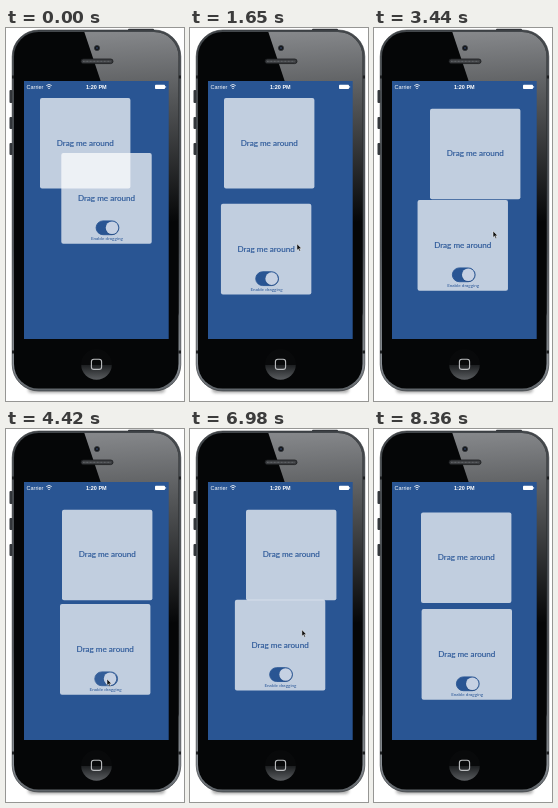
Animation, 178 px wide and 373 px high, one loop 9.44 s. Source, as an HTML page:

```html
<!DOCTYPE html>
<html lang="en">
<head>
<meta charset="utf-8">
<title>Draggable cards</title>
<style>
html, body { margin: 0; width: 100%; height: 100%; overflow: hidden; background: #fff; }
svg { display: block; width: 100%; height: 100%; }
text { font-family: Lato, "Open Sans", sans-serif; text-anchor: middle; fill: #2a5798; }
.label { font-size: 8.1px; stroke: #2a5798; stroke-width: .15; }
.small { font-size: 4.6px; }
.status text { font-family: "Liberation Sans", Arial, sans-serif; font-size: 5.5px; }
.status, .status text { fill: #fff; }
.card { fill: #fff; fill-opacity: .71; }
</style>
</head>
<body>
<svg viewBox="0 0 178 373" xmlns="http://www.w3.org/2000/svg">
  <defs>
    <linearGradient id="metal" x1="0" y1="0" x2="0" y2="1">
      <stop offset="0" stop-color="#43474b"/>
      <stop offset=".6" stop-color="#4d5257"/>
      <stop offset=".93" stop-color="#8b9096"/>
      <stop offset="1" stop-color="#5d6267"/>
    </linearGradient>
    <linearGradient id="gloss" gradientUnits="userSpaceOnUse" x1="140" y1="3" x2="150" y2="195">
      <stop offset="0" stop-color="#85878a"/>
      <stop offset=".35" stop-color="#56585a"/>
      <stop offset="1" stop-color="#050607"/>
    </linearGradient>
    <linearGradient id="home" x1="0" y1="0" x2="0" y2="1">
      <stop offset=".5" stop-color="#08090a"/>
      <stop offset=".52" stop-color="#1d1f21"/>
      <stop offset="1" stop-color="#5b5e61"/>
    </linearGradient>
    <filter id="soft" x="-20%" y="-200%" width="140%" height="500%"><feGaussianBlur stdDeviation="1.8"/></filter>
    <clipPath id="face"><rect x="8" y="4" width="164.5" height="356.5" rx="24.5"/></clipPath>
  </defs>

  <rect width="178" height="373" fill="#fff"/>
  <rect x="22" y="356" width="137" height="9" rx="4" fill="#777" opacity=".6" filter="url(#soft)"/>

  <g fill="#34383c">
    <rect x="3.5" y="62" width="3" height="13" rx="1"/>
    <rect x="3.5" y="89" width="3" height="12" rx="1"/>
    <rect x="3.5" y="115" width="3" height="12" rx="1"/>
    <rect x="122" y=".8" width="26" height="2" rx="1"/>
  </g>
  <rect x="6.2" y="2" width="168.6" height="361" rx="26.5" fill="url(#metal)" stroke="#2d3033" stroke-width=".6"/>
  <path d="M6 49h2.5M172.5 49h2.5M6 324h2.5M172.5 324h2.5" stroke="#1d1f21" stroke-width="3"/>
  <rect x="8" y="4" width="164.5" height="356.5" rx="24.5" fill="#050607"/>
  <path d="M78 3H173V288Z" fill="url(#gloss)" clip-path="url(#face)"/>

  <circle cx="91" cy="20" r="2.6" fill="#14161a" stroke="#303439" stroke-width=".7"/>
  <circle cx="91" cy="20" r=".9" fill="#30405e"/>
  <rect x="75" y="31" width="32" height="4.6" rx="2.3" fill="#3b3d40" stroke="#1a1b1d" stroke-width=".8"/>
  <path d="M77 33.3H105" stroke="#65686b" stroke-width="1.3" stroke-dasharray=".8 .6"/>
  <circle cx="90.5" cy="336.5" r="15.3" fill="url(#home)"/>
  <rect x="85.4" y="331.2" width="10.2" height="10.2" rx="2.5" fill="none" stroke="#bcbec0" stroke-width="1.1"/>

  <rect x="18" y="53" width="144.7" height="258" fill="#295593"/>
  <g class="status">
    <text x="29" y="61">Carrier</text>
    <text x="90.3" y="61" font-weight="bold">1:20 PM</text>
    <path d="M40.3 57.6Q43 55.2 45.7 57.6M41.4 59Q43 57.6 44.6 59" fill="none" stroke="#fff" stroke-width=".8"/>
    <circle cx="43" cy="60.4" r=".7"/>
    <rect x="149" y="56.7" width="10" height="4.4" rx=".8"/>
    <rect x="159.3" y="58" width=".8" height="1.8" rx=".3"/>
  </g>

  <g id="top">
    <rect class="card" width="90.4" height="90.4" rx="2"/>
    <text class="label" x="45.3" y="47.6">Drag me around</text>
  </g>
  <g id="bottom">
    <rect class="card" width="90.4" height="90.7" rx="2"/>
    <text class="label" x="45.2" y="47.8">Drag me around</text>
    <rect id="track" x="34.8" y="67.9" width="22.8" height="13.8" rx="6.9" stroke-width=".9"/>
    <circle id="shade" cy="75.4" r="6.5" fill="#1a3560" opacity=".28"/>
    <circle id="thumb" cy="74.8" r="6.3" fill="#c6d1e3"/>
    <text class="small" x="45.6" y="87.2">Enable dragging</text>
  </g>
  <path id="cursor" d="M0 0V6.4L1.5 5.1L2.5 7.4L3.6 6.9L2.6 4.7H4.6Z" fill="#111" stroke="#fff" stroke-width=".45" stroke-linejoin="round"/>
</svg>
<script>
const LOOP = 9440;
const SHOW = 920, HIDE = 8300;
const home = { top: [34, 70], bottom: [55.3, 125] };
const switchSpot = [101, 250];

const $ = id => document.getElementById(id);
const clamp = v => Math.min(1, Math.max(0, v));
const mix = (a, b, p) => a + (b - a) * p;
const mixPoint = (a, b, p) => a.map((v, i) => mix(v, b[i], p));
const ramp = (t, start, end) => {
  const p = clamp((t - start) / (end - start));
  return p * p * (3 - 2 * p);
};
const curve = (a, bend, b, p) => mixPoint(mixPoint(a, bend, p), mixPoint(bend, b, p), p);

// A drag carries a card along a curve, with the pointer holding it at `grab`.
const drag = (card, start, end, bend, to, grab) => ({
  card, start, end, bend, to,
  at: t => cardAt(card, t).map((v, i) => v + grab[i])
});
const tap = (start, end) => ({ start, end, at: () => switchSpot });
const shake = (start, end) => ({
  start, end,
  at: t => {
    const turn = 2 * Math.PI * (t - start) / (end - start);
    return [93 - 17 * Math.sin(turn), 218 + 8 * Math.sin(2 * turn)];
  }
});

const actions = [
  drag("bottom", 960, 1800, [35, 216], [30, 169], [76, 40]),
  drag("top", 1950, 2950, [21, 107.5], [56, 80.8], [56, 50.5]),
  drag("bottom", 3130, 3750, [45, 172], [54, 175], [75.5, 31]),
  tap(4250, 4480),
  shake(4820, 5770),
  tap(6120, 6400),
  drag("bottom", 6620, 7340, [39, 164], [47.6, 180], [67, 30]),
  drag("top", 7700, 8200, [51, 83], [47, 83.6], [56, 50])
];

function cardAt(card, t) {
  return actions
    .filter(a => a.card === card && a.start <= t)
    .reduce((pos, a) => curve(pos, a.bend, a.to, ramp(t, a.start, a.end)), home[card]);
}

// Between actions the pointer glides from the last one to the next.
function cursorAt(t) {
  const next = actions.find(a => a.end >= t);
  if (!next) return actions[actions.length - 1].at(t);
  const last = actions[actions.indexOf(next) - 1];
  if (t >= next.start || !last) return next.at(Math.max(t, next.start));
  return mixPoint(last.at(last.end), next.at(next.start), ramp(t, last.end, next.start));
}

const place = (id, pos) => $(id).setAttribute("transform", `translate(${pos})`);

function setSwitch(on) {
  const x = mix(41.7, 50.7, on);
  $("thumb").setAttribute("cx", x);
  $("shade").setAttribute("cx", x);
  $("track").setAttribute("fill", `rgba(41,85,147,${on})`);
  $("track").setAttribute("stroke", `rgb(${mixPoint([218, 225, 237], [41, 85, 147], on)})`);
}

function draw(t) {
  place("top", cardAt("top", t));
  place("bottom", cardAt("bottom", t));
  place("cursor", cursorAt(t));
  setSwitch(1 - ramp(t, 4380, 4630) + ramp(t, 6300, 6550));
  $("cursor").setAttribute("visibility", t >= SHOW && t < HIDE ? "visible" : "hidden");
}

const start = performance.now();
function tick() {
  draw((performance.now() - start) % LOOP);
  requestAnimationFrame(tick);
}
tick();
</script>
</body>
</html>
```
